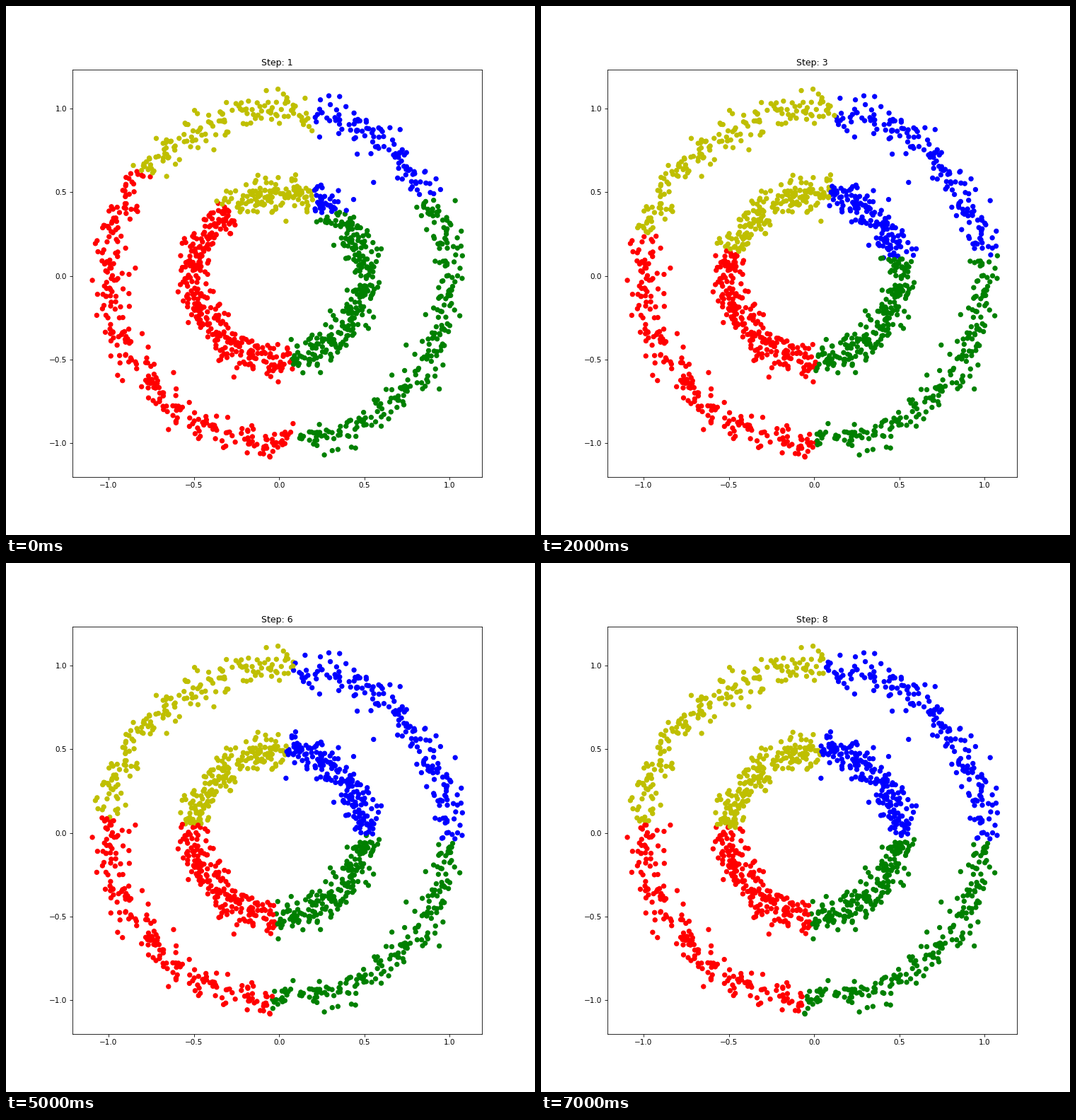
Write a matplotlib script that moves like this. It is 748x748 px and loops after 8 s.

```python
import numpy as np
import matplotlib.pyplot as plt
from matplotlib.animation import FuncAnimation

STEPS = 8
SAMPLES = 1500
NOISE = 0.05
COLORS = np.array([[0, 0, 1], [0, 0.5, 0], [0.75, 0.75, 0], [1, 0, 0]])

# Starting centres of the blue, green, yellow and red clusters
START = np.array([[0.366, 0.968], [0.557, -0.169],
                  [0.050, 0.968], [-0.444, -0.231]])


def noisy_circles(n, factor, noise, seed):
    """Two shuffled concentric circles with Gaussian noise."""
    rng = np.random.RandomState(seed)
    t = np.linspace(0, 2 * np.pi, n // 2, endpoint=False)
    outer = np.column_stack([np.cos(t), np.sin(t)])
    pts = np.vstack([outer, factor * outer])
    order = np.arange(n)
    rng.shuffle(order)
    return pts[order] + rng.normal(scale=noise, size=pts.shape)


def nearest(pts, centres):
    gaps = pts[:, None, :] - centres[None, :, :]
    return (gaps ** 2).sum(axis=2).argmin(axis=1)


def kmeans_history(pts, centres, steps):
    """Cluster labels after each assignment pass."""
    history = []
    for _ in range(steps):
        labels = nearest(pts, centres)
        history.append(labels)
        centres = np.array([pts[labels == k].mean(axis=0)
                            for k in range(len(centres))])
    return history


points = noisy_circles(SAMPLES, 0.5, NOISE, seed=0)
history = kmeans_history(points, START, STEPS)

fig, ax = plt.subplots(figsize=(10, 10), dpi=74.8)
dots = ax.scatter(*points.T)
title = ax.set_title("Step: 1")
ticks = np.arange(-1, 1.1, 0.5)
ax.set_xticks(ticks)
ax.set_yticks(ticks)
ax.set_xlim(-1.2135, 1.1900)
ax.set_ylim(-1.2005, 1.2333)


def update(frame):
    dots.set_color(COLORS[history[frame]])
    title.set_text(f"Step: {frame + 1}")
    return dots, title


anim = FuncAnimation(fig, update, frames=STEPS, interval=1000, repeat=True)
plt.show()
```
